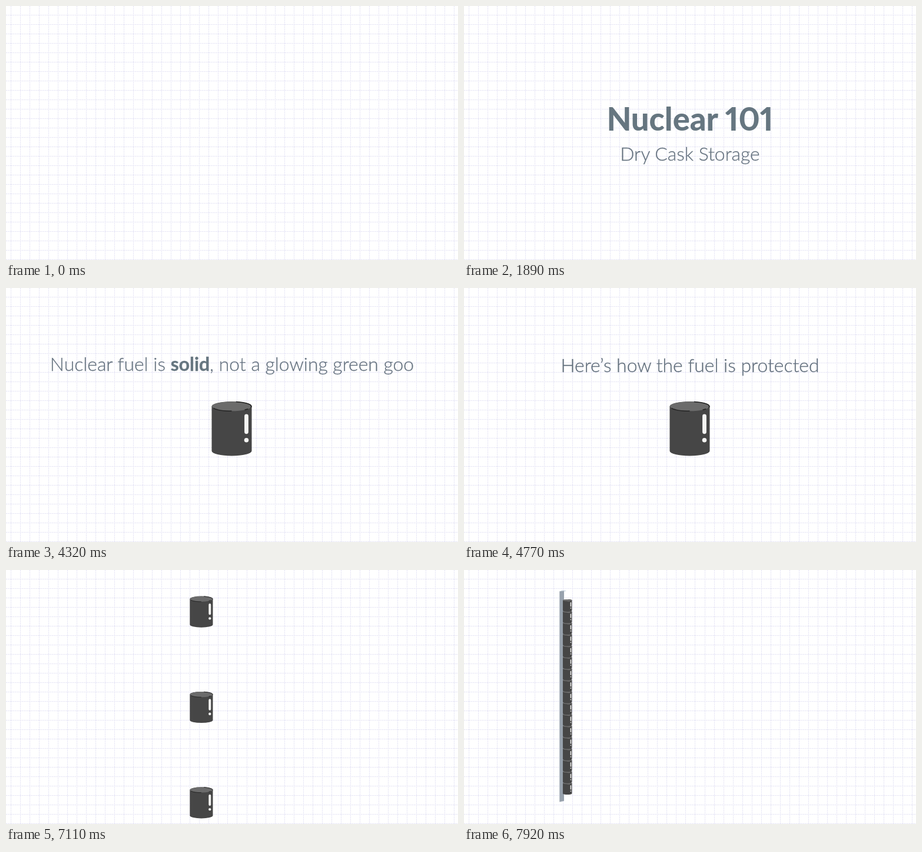
An HTML page with a canvas that plays this animation: 768x432 px, repeating every 8 s.

```html
<!DOCTYPE html>
<html lang="en">
<head>
<meta charset="utf-8">
<title>Dry Cask Storage</title>
<style>
  html, body { margin: 0; width: 100%; height: 100%; overflow: hidden; background: #fff; }
  canvas, svg { position: absolute; left: 0; top: 0; width: 768px; height: 432px; }
  text {
    font: 300 31.9px Lato, "Open Sans", sans-serif;
    fill: #626f7d; stroke: #626f7d; stroke-width: 0.35px;
    text-anchor: middle;
  }
  .bold { font-weight: 700; fill: #61727c; }
  .big {
    font-size: 54.3px; font-weight: 800; font-variant-numeric: proportional-nums;
    fill: #61727c; stroke: none;
  }
</style>
</head>
<body>
<canvas id="stage" width="768" height="432"></canvas>
<svg viewBox="0 0 768 432">
  <g id="title">
    <text class="big" x="384" y="213.5">Nuclear 101</text>
    <text x="384" y="265">Dry Cask Storage</text>
  </g>
  <g id="solid">
    <text x="384" y="143">Nuclear fuel is <tspan class="bold">solid</tspan>, not a glowing green goo</text>
  </g>
  <g id="protect">
    <text x="384" y="143">Here’s how the fuel is protected</text>
  </g>
</svg>
<script>
const W = 768, H = 432, LOOP = 8000, STEP = 90;
const PITCH = 85.5, SMALL = 0.2275;
const ctx = document.getElementById('stage').getContext('2d');

const captions = [
  { id: 'title', start: 0, inMs: 450, out: 1800 },
  { id: 'solid', start: 2160, inMs: 360, out: 4230 },
  { id: 'protect', start: 4410, inMs: 360, out: 6570 }
].map(c => ({ ...c, el: document.getElementById(c.id) }));

const span = (t, a, b) => Math.min(1, Math.max(0, (t - a) / (b - a)));
const smooth = u => u * u * (3 - 2 * u);
const mix = (a, b, u) => a + (b - a) * u;
const backOut = u => 1 + 2.7 * (u - 1) ** 3 + 1.7 * (u - 1) ** 2;

function showCaption({ el, start, inMs, out }, t) {
  const a = span(t, start, start + inMs);
  const b = span(t, out, out + 270);
  const dy = 18 * (1 - a) ** 3 - 18 * b * b;
  el.setAttribute('transform', `translate(0 ${dy.toFixed(2)})`);
  el.setAttribute('opacity', smooth(a) * (1 - b ** 3));
}

function drawGrid() {
  ctx.fillStyle = '#fff';
  ctx.fillRect(0, 0, W, H);
  ctx.strokeStyle = '#e3e2f4';
  ctx.lineWidth = 1;
  ctx.setLineDash([2, 1]);
  ctx.beginPath();
  for (let x = 8; x < W; x += 16.04) {
    const px = Math.floor(x) + 0.5;
    ctx.moveTo(px, 0);
    ctx.lineTo(px, H);
  }
  for (let y = 15.5; y < H; y += 16) {
    ctx.moveTo(0, y);
    ctx.lineTo(W, y);
  }
  ctx.stroke();
  ctx.setLineDash([]);
}

function rimArc(from, to) {
  ctx.beginPath();
  ctx.ellipse(0, -38, 33.4, 8, 0, from, to);
  ctx.stroke();
}

function drawPellet(y) {
  ctx.save();
  ctx.translate(0, y);
  ctx.fillStyle = '#464646';
  ctx.beginPath();
  ctx.ellipse(0, -38, 34, 8.2, 0, Math.PI, 0);
  ctx.ellipse(0, 37.7, 34, 8.5, 0, 0, Math.PI);
  ctx.fill();

  ctx.fillStyle = '#6b6b6b';
  ctx.beginPath();
  ctx.ellipse(0, -38, 33.4, 8, 0, 0, 7);
  ctx.fill();
  ctx.strokeStyle = '#222';
  ctx.lineWidth = 1.6;
  rimArc(-1.35, 0.25);
  rimArc(0.6, 0.85);
  rimArc(1.57, 2.75);

  ctx.fillStyle = '#f4f4f2';
  ctx.beginPath();
  ctx.roundRect(21.6, -24.7, 6.8, 33.6, 3.4);
  ctx.moveTo(28.8, 19.5);
  ctx.arc(25, 19.5, 3.8, 0, 7);
  ctx.fill();
  ctx.restore();
}

function drawTube(u) {
  if (!u) return;
  ctx.save();
  ctx.globalAlpha = u;
  ctx.translate(-150 * (1 - u), 0);
  ctx.fillStyle = '#dbe4eb';
  ctx.beginPath();
  ctx.ellipse(-30, -793, 20, 6, 0, 0, 7);
  ctx.fill();
  ctx.fillStyle = '#98a2ad';
  ctx.beginPath();
  ctx.moveTo(-59, -790);
  ctx.lineTo(-25, -793);
  ctx.lineTo(-25, 777);
  ctx.lineTo(-59, 785);
  ctx.fill();
  ctx.restore();
}

function drawFuel(t) {
  if (t <= 2250) return;
  const pop = backOut(span(t, 2250, 2790));
  const move = smooth(span(t, 6720, 7920));
  const shrink = smooth(span(t, 6720, 7660));
  const gather = smooth(span(t, 6750, 7380));
  const scale = pop * SMALL ** shrink;
  const pitch = PITCH + 500 * (1 - gather);

  ctx.save();
  ctx.translate(mix(383.5, 175.7, move), mix(239.3, 216, move));
  ctx.scale(scale, scale);
  drawTube(smooth(span(t, 7560, 7920)));
  if (t > 6720) {
    // lower pellets first, so each one overlaps the pellet beneath it
    for (let i = 8; i >= -8; i--) drawPellet(i * pitch);
  } else {
    drawPellet(0);
  }
  ctx.restore();
}

const begin = performance.now();
function frame(now) {
  const t = Math.floor((Math.max(0, now - begin) % LOOP) / STEP) * STEP;
  drawGrid();
  drawFuel(t);
  captions.forEach(c => showCaption(c, t));
  requestAnimationFrame(frame);
}
frame(begin);
</script>
</body>
</html>
```
